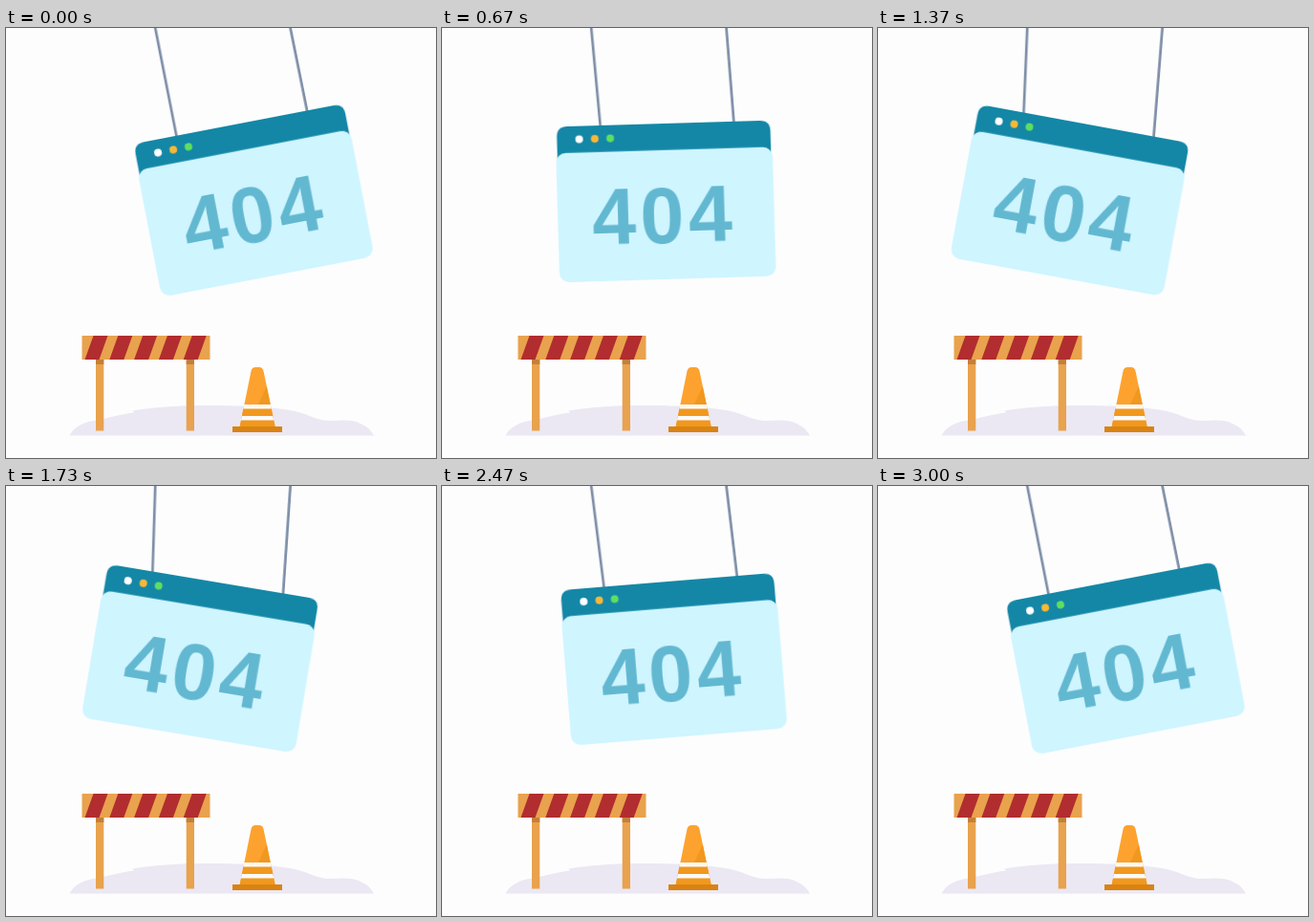
Recreate the animation shown at these times as an HTML page. Size 450 by 450 pixels, loop 3030 ms.

```html
<!DOCTYPE html>
<html lang="en">
<head>
<meta charset="utf-8">
<title>404</title>
<style>
  html, body { margin: 0; width: 100%; height: 100%; overflow: hidden; background: #fdfdfe; }
  svg { display: block; width: 100vw; height: 100vh; }

  /* Everything that swings shares one easing; the last 30 ms hold the start pose. */
  .swing {
    animation: swing 3030ms cubic-bezier(.333, 0, .667, 1) infinite;
    transform-origin: var(--pin);
  }
  .rope { stroke: #7d8da6; stroke-width: 2.7; }
  .left  { --pin: 156.2px 0px; --from: -11.1deg; --to: 2.7deg; --shift: 0px; }
  .right { --pin: 297.6px 0px; --from: -11.4deg; --to: 4.9deg; --shift: 0px; }
  .sign  { --pin: 229.4px 111.3px; --from: -10.9deg; --to: 10.9deg; --shift: 16.1px; }

  @keyframes swing {
    0%, 99.01%, 100% { transform: translateX(var(--shift)) rotate(var(--from)); }
    49.505% { transform: translateX(calc(-1 * var(--shift))) rotate(var(--to)); }
  }

  .code {
    font: bold 82.5px "Liberation Sans", Arial, sans-serif;
    letter-spacing: 4.5px;
    fill: #62b8d0;
  }
</style>
</head>
<body>
<svg viewBox="0 0 450 450">
  <path fill="#ebe8f3" d="M66.500 426.500C71 417 82 412 97 410C108 408 118 404.500 134 402.500L132.500 400.500C152 397 180 395 213 395C250 395 288 397 306 402C318 405 324 410 337 411C350 411 362 409 371 414C378 417 382 421 385 426.500Z"/>

  <!-- barrier -->
  <g>
    <path fill="#e9a24d" d="M94 346h8.300v75.500h-8.300zM188.700 346h8.300v75.500h-8.300z"/>
    <path fill="#c4803a" d="M94 346h8.300v6h-8.300zM188.700 346h8.300v6h-8.300z"/>
    <rect x="79.500" y="322" width="134" height="25" fill="#e9a24d"/>
    <path fill="#b12d2f" d="M91.500 322h15l-9 25h-15zM117.300 322h15l-9 25h-15zM143.100 322h15l-9 25h-15zM168.900 322h15l-9 25h-15zM194.700 322h15l-9 25h-15z"/>
  </g>

  <!-- cone -->
  <g>
    <path fill="#fda22f" d="M244.500 418L256.500 359Q257.500 355 261 355H265Q268.500 355 269.500 359L281.800 418Z"/>
    <path fill="#f0981f" d="M272.800 375L276.700 394H264ZM248.500 398H277.700L281.800 418H244.500Z"/>
    <path fill="#fdfaf6" d="M249.300 394H276.800L277.800 398.500H248.400ZM246.800 406H279.300L280.300 410.500H245.900Z"/>
    <rect x="237" y="417" width="52" height="6" fill="#da8311"/>
  </g>

  <line class="rope swing left" x1="156.200" y1="-6" x2="156.200" y2="126"/>
  <line class="rope swing right" x1="297.600" y1="-6" x2="297.600" y2="126"/>

  <g class="sign swing">
    <g transform="translate(229.400 181.300)">
      <path fill="#1487a6" d="M-111.800 -40V-70.300Q-111.800 -81.300 -100.800 -81.300H100.800Q111.800 -81.300 111.800 -70.300V-40Z"/>
      <rect x="-113.300" y="-53.500" width="226.600" height="135.200" rx="10" fill="#cff5ff"/>
      <circle cx="-88.500" cy="-67.500" r="4" fill="#fff"/>
      <circle cx="-72.200" cy="-67.500" r="4" fill="#f8b836"/>
      <circle cx="-56" cy="-67.500" r="4" fill="#5fdf62"/>
      <text class="code" x="-77.500" y="43.500">404</text>
    </g>
  </g>
</svg>
</body>
</html>
```
